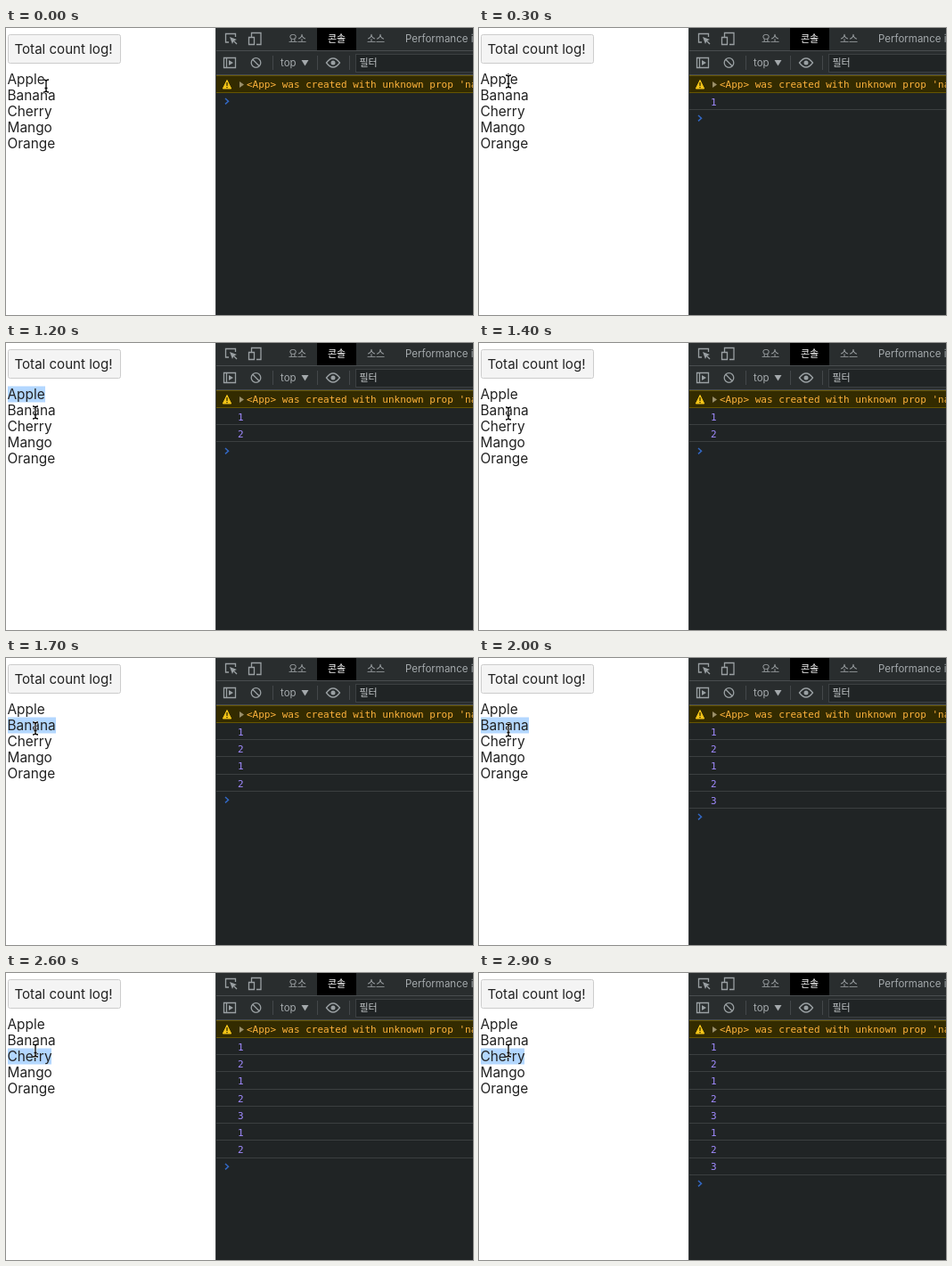
Animation, 524 px wide and 322 px high, one loop 3 s. Source, as an HTML page:

```html
<!DOCTYPE html>
<html lang="ko">
<head>
<meta charset="utf-8">
<title>Click count log</title>
<style>
  html, body { margin: 0; width: 100%; height: 100%; overflow: hidden; background: #fff; }
  svg { display: block; width: 524px; height: 322px; }

  .page { font: 15.4px Inter, sans-serif; fill: #222; }
  .page .label { font-size: 15.1px; }
  .panel { fill: #202425; }
  .tools { font: 11.5px Inter, "Noto Sans CJK KR", "Noto Sans CJK", sans-serif; fill: #a4a9ac; }
  .tools .ko { font: 11px "Noto Sans CJK KR", "Noto Sans CJK", sans-serif; }
  .icon { fill: none; stroke: #9aa0a3; stroke-width: 1.3; }
  .icon .solid { fill: #9aa0a3; stroke: none; }
  .mono { font: 11px "DejaVu Sans Mono", monospace; }
  .logs { fill: #a08aff; }
  .rule { stroke: #3b3f40; }

  /* Everything moves in hard steps on one three second clock. */
  .tail, .selection, .cursor { animation: 3s step-end infinite; }
  .tail { animation-name: tail; }
  .selection { animation-name: selection; fill: #b3d7ff; }
  .cursor { animation-name: cursor; }

  /* The empty console below the last entry slides down to reveal the next. */
  @keyframes tail {
    0% { transform: translateY(0); }
    10% { transform: translateY(19px); }
    16.66% { transform: translateY(39px); }
    50% { transform: translateY(58px); }
    56.66% { transform: translateY(77px); }
    63.33% { transform: translateY(96px); }
    76.66% { transform: translateY(115px); }
    86.66% { transform: translateY(135px); }
    93.33%, 100% { transform: translateY(154px); }
  }
  @keyframes selection {
    0% { width: 0; transform: translateY(0); }
    13.33% { width: 42px; transform: translateY(0); }
    46.66% { width: 0; transform: translateY(18px); }
    53.33% { width: 54px; transform: translateY(18px); }
    73.33% { width: 0; transform: translateY(36px); }
    83.33%, 100% { width: 49px; transform: translateY(36px); }
  }
  @keyframes cursor {
    0% { transform: translate(45px, 65px); }
    3.33% { transform: translate(39px, 62px); }
    6.66% { transform: translate(33px, 60px); }
    26.66% { transform: translate(33px, 66px); }
    30% { transform: translate(33px, 69px); }
    33.33% { transform: translate(33px, 73px); }
    36.66% { transform: translate(33px, 76px); }
    40% { transform: translate(33px, 78px); }
    43.33% { transform: translate(33px, 79px); }
    66.66% { transform: translate(33px, 81px); }
    70% { transform: translate(33px, 84px); }
    73.33% { transform: translate(33px, 86px); }
    83.33%, 100% { transform: translate(33px, 87px); }
  }
</style>
</head>
<body>
<svg viewBox="0 0 524 322">
  <defs>
    <path id="beam" d="M-3-7q3 0 3 2q0-2 3-2M0-5V5M-3 7q3 0 3-2q0 2 3 2M-1.5 2.5h3"/>
  </defs>

  <g class="page">
    <rect x="2.5" y="7.5" width="126" height="32" rx="2" fill="#f4f4f4" stroke="#ccc"/>
    <text class="label" x="9.5" y="29">Total count log!</text>
    <rect class="selection" x="2" y="48.5" width="0" height="18"/>
    <text x="1.5" y="63">Apple</text>
    <text x="1.5" y="81">Banana</text>
    <text x="1.5" y="99">Cherry</text>
    <text x="1.5" y="117">Mango</text>
    <text x="1.5" y="135">Orange</text>
  </g>

  <rect class="panel" x="235" width="289" height="322"/>

  <g class="mono logs">
    <text x="260" y="86.5">1</text>
    <text x="260" y="105.5">2</text>
    <text x="260" y="125">1</text>
    <text x="260" y="144.5">2</text>
    <text x="260" y="163.5">3</text>
    <text x="260" y="182.5">1</text>
    <text x="260" y="201.5">2</text>
    <text x="260" y="221">3</text>
  </g>
  <path class="rule" d="M236 91.5h288M236 110.5h288M236 130.5h288M236 149.5h288M236 168.5h288M236 187.5h288M236 207.5h288M236 226.5h288"/>

  <g class="tail">
    <rect class="panel" x="236" y="73" width="288" height="249"/>
    <path d="M246 79l3.5 3.2-3.500 3.200" fill="none" stroke="#3268c4" stroke-width="1.5"/>
  </g>

  <rect x="236" y="53" width="288" height="20" fill="#332b00"/>
  <path d="M236 53.5h288M236 72.5h288" stroke="#665500"/>
  <path d="M248 58.500l4.700 9.500h-9.400z" fill="#f5c518" stroke="#f5c518" stroke-linejoin="round"/>
  <path d="M248 61v4M248 66v1.3" stroke="#332b00" stroke-width="1.3"/>
  <path d="M262 60l5 3.500-5 3.500z" fill="#9a8f6a"/>
  <text class="mono" x="270" y="67" fill="#ffb43c">&lt;App&gt; was created with unknown prop 'na</text>

  <rect x="236" width="288" height="53" fill="#292d2e"/>
  <rect x="349" width="44" height="25" fill="#000"/>
  <path d="M236 25.5h288M236 52.5h288" stroke="#494d4f"/>
  <path d="M299.5 31v16M349.5 31v16M385.5 31v16" stroke="#44484a"/>
  <rect class="panel" x="392.5" y="29.5" width="140" height="20" stroke="#3c4042"/>

  <g class="icon">
    <path d="M250 16h-3.5V6.5h11V10M255 14l4 4"/>
    <path class="solid" d="M251 10l8 3-3.5 1.5L254 18z"/>
    <path d="M275.5 10V5.5h10.5v13h-5M272.5 10.5h6v8h-6z"/>
    <path d="M244.5 33.5h13v11h-13zM247.5 33.5v11"/>
    <path class="solid" d="M250 36l5 3-5 3z"/>
    <circle cx="280.5" cy="39" r="5.3"/>
    <path d="M276.8 35.3l7.4 7.4"/>
    <path d="M359.5 39q7.5-10 15 0q-7.5 10-15 0z"/>
    <circle class="solid" cx="367" cy="39" r="2.5"/>
  </g>

  <g class="tools">
    <text class="ko" x="317" y="16">요소</text>
    <text class="ko" x="361" y="16" fill="#fff">콘솔</text>
    <text class="ko" x="405" y="16">소스</text>
    <text x="448" y="16">Performance i</text>
    <text x="308" y="43">top</text>
    <path d="M331.5 36h8l-4 6.5z"/>
    <text class="ko" x="396.5" y="43" fill="#c4c8ca">필터</text>
  </g>
  <path d="M235.5 0v322" stroke="#3b3f40"/>

  <g class="cursor" fill="none">
    <use href="#beam" stroke="#fff" stroke-width="2.6"/>
    <use href="#beam" stroke="#000" stroke-width="1.3"/>
  </g>
</svg>
</body>
</html>
```
